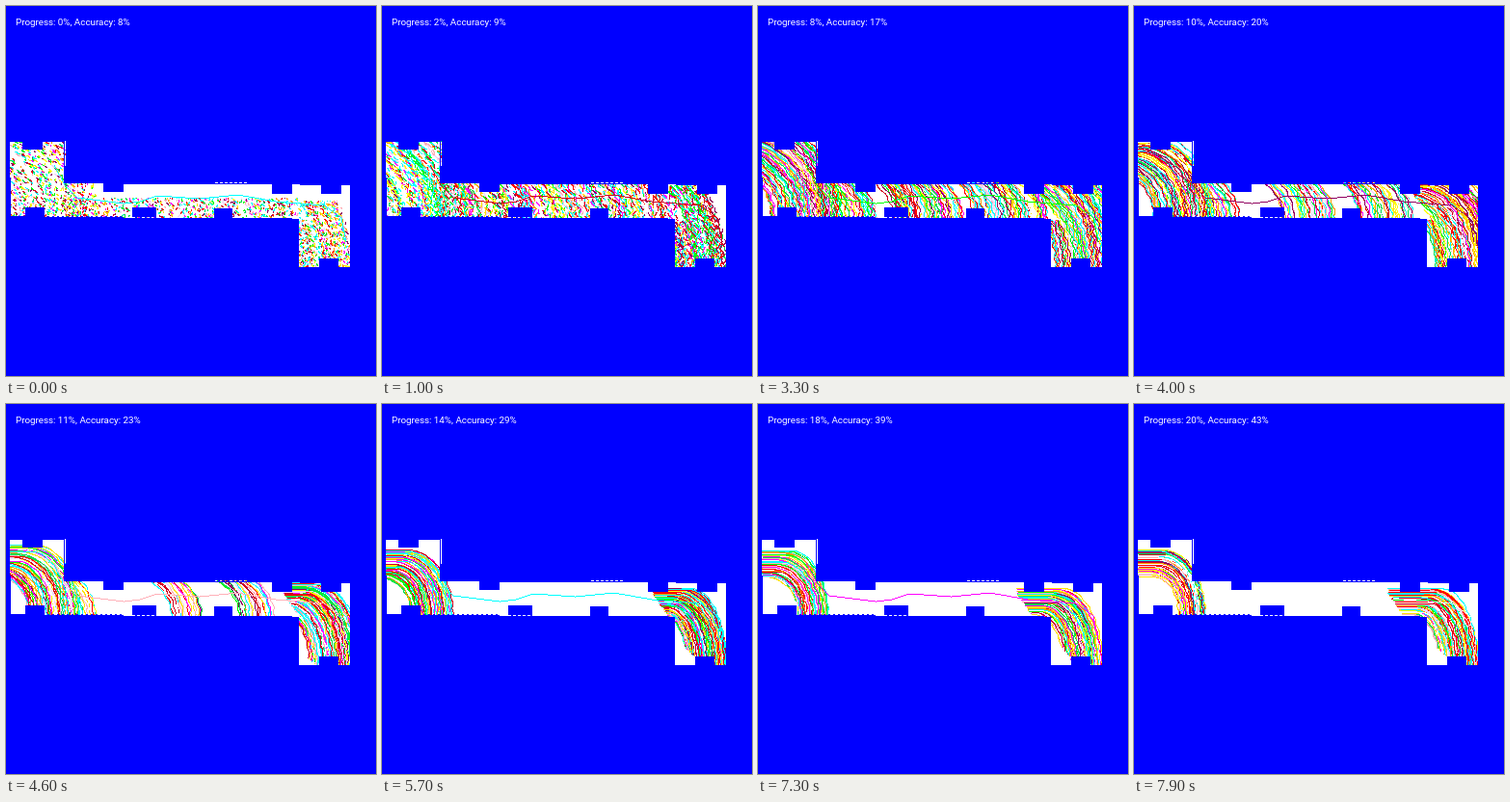
An HTML page with a canvas that plays this animation: 384x384 px, repeating every 8 s.

```html
<!DOCTYPE html>
<html lang="en">
<head>
<meta charset="utf-8">
<style>
  html, body { margin: 0; width: 100%; height: 100%; overflow: hidden; background: #00f; }
  canvas { display: block; width: 384px; height: 384px; }
</style>
</head>
<body>
<canvas id="stage" width="384" height="384"></canvas>
<script>
const SIZE = 384, LOOP = 8000, STEP = 100;
const ctx = document.getElementById('stage').getContext('2d');
const image = ctx.createImageData(SIZE, SIZE);
const pixels = new Uint32Array(image.data.buffer);
const track = new Uint8Array(SIZE * SIZE);

const rgb = hex => {
  const n = parseInt(hex, 16);
  return (0xff000000 | (n & 255) << 16 | (n & 0xff00) | n >> 16) >>> 0;
};
const BLUE = rgb('0000ff'), WHITE = rgb('ffffff');
const PALETTE = ['00ffff', '00ffff', 'ff0000', 'ff00ff', 'ffb0b8', '00ff00', 'f0d8f8',
  'ffff00', 'ffa000', 'ffffff', 'd00020', '00e050', '900060', 'ffe000'].map(rgb);

const mix = (a, b, k) => a + (b - a) * k;
const ramp = (time, from, to) => Math.min(1, Math.max(0, (time - from) / (to - from)));
const smooth = k => k * k * (3 - 2 * k);

function random(seed) {
  return () => {
    seed = seed + 0x6d2b79f5 | 0;
    let h = Math.imul(seed ^ seed >>> 15, 1 | seed);
    h = h + Math.imul(h ^ h >>> 7, 61 | h) ^ h;
    return ((h ^ h >>> 14) >>> 0) / 4294967296;
  };
}

// Track: white rooms, ragged edges, then the bays cut out of the walls
function area(x1, y1, x2, y2, value) {
  for (let y = y1; y < y2; y++) track.fill(value, y * SIZE + x1, y * SIZE + x2);
}
function dashes(x1, x2, y, value) {
  for (let x = x1; x < x2; x += 5) area(x, y, x + 3, y + 1, value);
}
function buildTrack() {
  area(4, 141, 60, 218, 1);
  area(4, 178, 5, 218, 0);
  area(61, 140, 62, 166, 1);
  area(60, 184, 122, 218, 1);
  area(122, 185, 305, 220, 1);
  area(297, 186, 357, 221, 1);
  area(304, 221, 357, 271, 1);
  dashes(40, 131, 218, 1);
  dashes(217, 248, 183, 1);
  const bay = (x, y, height, width = 21) => area(x, y, x + width, y + height, 0);
  bay(17, 140, 9);
  bay(20, 209, 10, 20);
  bay(101, 184, 9);
  bay(131, 209, 11, 25);
  bay(216, 210, 10, 19);
  bay(276, 185, 10);
  bay(327, 186, 9);
  bay(325, 262, 9, 20);
  dashes(131, 153, 219, 1);
}

function plot(x, y, color) {
  const i = (y | 0) * SIZE + (x | 0);
  if (track[i]) pixels[i] = color;
}

// Traced backwards: from the floor up a quarter ellipse, then level to the left
function arc(endX, endY, a, b, top, left, put) {
  const step = 0.7 / Math.max(a, b);
  let x = endX, y = endY;
  for (let s = 0; s < Math.PI / 2 && y > top && x > left; s += step) {
    x = endX - a * (1 - Math.cos(s));
    y = endY - b * Math.sin(s);
    put(x, y);
  }
  if (y > top) for (; x > left; x--) put(x, y);
}

// How far the training has come: turning ability, grouping, density of dashes
function stateAt(time) {
  return {
    bend: Math.max(0.005, smooth(ramp(time, 1500, 5500))),
    settle: ramp(time, 2000, 7900),
    shrink: ramp(time, 2000, 5400) ** 2,
    wake: ramp(time, 0, 1000),
    duty: mix(0.23, 0.95, ramp(time, 0, 2300))
  };
}

function brush({ bend, duty }, rnd) {
  const color = PALETTE[rnd() * PALETTE.length | 0];
  const period = 7 + (rnd() * 5 | 0), phase = rnd() * period | 0;
  const wave = rnd() * 6, wobble = mix(1.4, 0.6, bend);
  return (x, y) => {
    if (((y | 0) + phase) % period < period * duty)
      plot(x + wobble * Math.sin(y * 0.5 + wave), y, color);
  };
}

// A bundle of arcs from an inner to an outer shape, with some scatter in the turn
function bundle(state, rnd, { count, low, high, floor, inner, outer, top, left, allow }) {
  for (let i = 0; i < count; i++) {
    const k = (i * 0.618034 + rnd() * 0.1) % 1;
    const scatter = 1 + (rnd() - 0.5) * 0.5;
    const a = mix(inner[0], outer[0], k) * scatter / state.bend;
    const b = mix(inner[1], outer[1], k) / Math.sqrt(state.bend);
    const put = brush(state, rnd);
    arc(mix(low, high, k), floor, a, b, top, left,
      allow ? (x, y) => allow(x, y) && put(x, y) : put);
  }
}

function drawLeft(state, rnd) {
  bundle(state, rnd, {
    count: mix(95, 50, state.settle),
    low: mix(5, 46, state.settle),
    high: mix(95, 74, state.bend),
    floor: 218, inner: [30, 38], outer: [44, 67], top: 139, left: 4
  });
}

function drawCorridor(state, rnd) {
  for (const [from, to, focus] of [[61, 131, 68], [131, 216, 200], [216, 306, 262]]) {
    const low = mix(from, focus, state.shrink), high = mix(to, focus, state.shrink);
    bundle(state, rnd, {
      count: Math.floor((high - low) * mix(1, 0.5, state.bend)),
      low, high, floor: 221, inner: [38, 42], outer: [38, 42],
      top: mix(200, 183, state.wake), left: 50
    });
  }
}

function drawRight(state, rnd) {
  const start = mix(298, 264, state.settle ** 1.5);
  const room = 222 + 80 * (1 - state.bend);
  bundle(state, rnd, {
    count: mix(100, 75, state.settle),
    low: mix(304, 316, state.bend),
    high: 358 + 30 * Math.sin(Math.PI * state.bend),
    floor: 271, inner: [26, 52], outer: [47, 80],
    top: mix(203, 185, state.wake), left: start,
    allow: (x, y) => y < 222
      ? x > start + (y - 197) * 0.7
      : x > 325 || y < room + 40 * Math.max(0, (x - 304) / 21) ** 0.4
  });
}

const GUIDE = [[50, 165], [62, 187], [74, 199], [122, 205], [138, 203], [157, 197],
  [200, 200], [240, 196], [280, 203], [330, 207], [348, 220], [353, 245]];
function drawGuide(color) {
  for (let i = 1; i < GUIDE.length; i++) {
    const [x1, y1] = GUIDE[i - 1], [x2, y2] = GUIDE[i];
    const n = Math.max(x2 - x1, y2 - y1);
    for (let s = 0; s < n; s++) plot(mix(x1, x2, s / n), mix(y1, y2, s / n), color);
  }
}

function draw(frame) {
  const time = (frame - 1) * STEP * LOOP / (LOOP - STEP);
  const state = stateAt(time), rnd = random(frame * 977 + 5);
  for (let i = 0; i < pixels.length; i++) pixels[i] = track[i] ? WHITE : BLUE;
  drawCorridor(state, rnd);
  drawLeft(state, rnd);
  drawRight(state, rnd);
  drawGuide(PALETTE[frame % PALETTE.length]);
  ctx.putImageData(image, 0, 0);

  const progress = Math.round((frame - 1) * 0.25);
  const accuracy = Math.round(8 + 35 * ((frame - 1) / 78) ** 1.5);
  ctx.font = '9.8px Roboto, sans-serif';
  ctx.fillStyle = '#fff';
  ctx.fillText(`Progress: ${progress}%, Accuracy: ${accuracy}%`, 10, 20);
}

buildTrack();
let shown = -1;
function tick() {
  const frame = Math.max(1, Math.floor(performance.now() % LOOP / STEP));
  if (frame !== shown) draw(shown = frame);
  requestAnimationFrame(tick);
}
tick();
</script>
</body>
</html>
```
